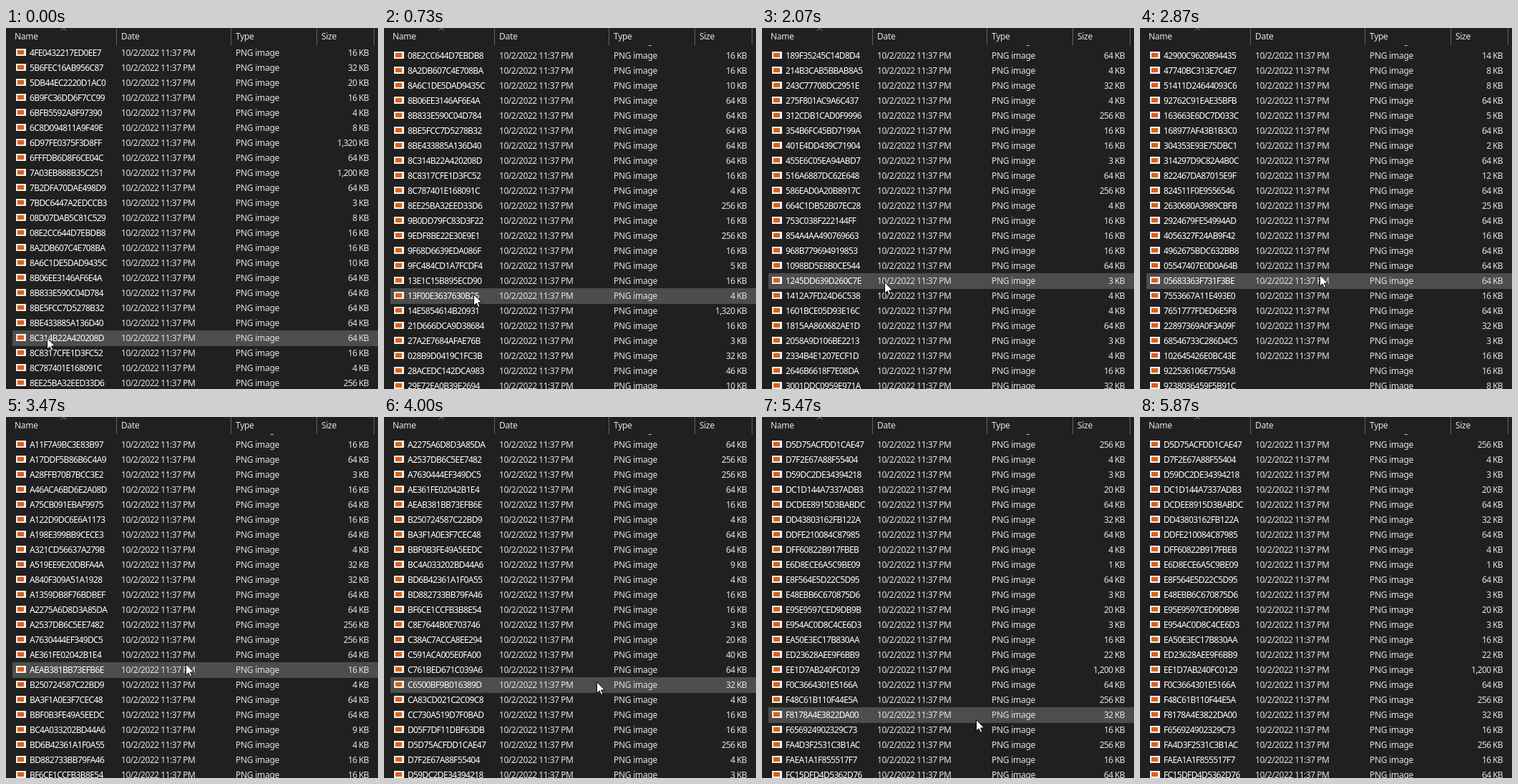
Write an HTML page with a canvas that moves like this. It is 520 px wide and 505 px high and loops after 6470 ms.

```html
<!DOCTYPE html>
<html lang="en">
<head>
<meta charset="utf-8">
<title>File list</title>
<style>
html, body { margin: 0; width: 100%; height: 100%; overflow: hidden; background: #202020; }
canvas { display: block; }
</style>
</head>
<body>
<canvas id="stage" width="520" height="505"></canvas>
<script>
const ctx = document.getElementById('stage').getContext('2d');
const LOOP = 6470, ROW = 21, HEADER = 24;

// "name size" per entry; "*count prefix from to" stands for generated entries
const listing = `4FE0432217ED0EE7 16;5B6FEC16AB956C87 32;5DB44EC2220D1AC0 20;6B9FC36DD6F7CC99 16
6BFB5592A8F97390 4;6C8D094811A9F49E 8;6D97FE0375F3D8FF 1,320;6FFFDB6D8F6CE04C 64
7A03EB888B35C251 1,200;7B2DFA70DAE498D9 64;7BDC6447A2EDCCB3 3;08D07DAB5C81C529 8
08E2CC644D7EBDB8 16;8A2DB607C4E708BA 16;8A6C1DE5DAD9435C 10;8B06EE3146AF6E4A 64
8B833E590C04D784 64;8BE5FCC7D5278B32 64;8BE433885A136D40 64;8C314B22A420208D 64
8C8317CFE1D3FC52 16;8C787401E168091C 4;8EE25BA32EED33D6 256;9B0DD79FC83D3F22 16
9EDF8BE22E30E9E1 256;9F68D6639EDA086F 16;9FC484CD1A7FCDF4 5;13E1C15B895ECD90 16
13F00E3637630B25 4;14E5854614B20931 1,320;21D666DCA9D38684 16;27A2E7684AFAE76B 3
028B9D0419C1FC3B 32;28ACEDC142DCA983 46;29E72EA0B39E2694 10
*7 - 30 41
41DA217FA5E6BC39 64;50B39A1EE8E60E87 4;51C093413D5ECABD 64;57F855ED14189B34 4
58CCAB7351D5773A 16;59EE95622AE77E42 256;64C2724A09E18167 16;68F2BCD5BBCC39F4 3
70AAB3A5C6B40F6C 32;70BC98A07B249B80 64;71F94D43FFFE0299 3;75D5142E0A45D860 64
76C8A1A0DA66C37C 16;76E9934F9EAAFBF9 30;079C1FE87FBF5124 6;80C7401289FBF3B7 16
80EA744826A0E925 5;81F77C062194B5C3 16;86ACB7E693DF3E67 4;87A677E862FC5922 16
87C2DAB6DE3730C5 64;00088D8C9802AD85 16;88B29CD9E8E873D9 32
*49 - 89 42000
42900C9620B94435 14;47740BC313E7C4E7 8;51411D24644093C6 8;92762C91EAE35BFB 64
163663E6DC7D033C 5;168977AF43B1B3C0 64;304353E93E75DBC1 2;314297D9C82A4B0C 64
822467DA87015E9F 12;824511F0E9556546 64;2630680A3989CBFB 25;2924679FE54994AD 64
4056327F24AB9F42 16;4962675BDC632BB8 64;05547407E0D0A64B 64;05683363F731F3BE 64
7553667A11E493E0 16;7651777FDED6E5F8 64;22897369A0F3A09F 32;68546733C286D4C5 3
102645426E0BC43E 16;922536106E7755A8 16;9238036459F5B91C 8
*16 A 1 2200
A2275A6D8D3A85DA 64;A2537DB6C5EE7482 256;A7630444EF349DC5 256;AE361FE02042B1E4 64
AEAB381BB73EFB6E 16;B250724587C22BD9 4;BA3F1A0E3F7CEC48 64;BBF0B3FE49A5EEDC 64
BC4A033202BD44A6 9;BD6B42361A1F0A55 4;BD882733BB79FA46 16;BF6CE1CCFB3B8E54 16
C8E7644B0E703746 3;C38AC7ACCA8EE294 20;C591ACA005E0FA00 40;C761BED671C039A6 64
C6500BF9B016389D 32;CA83CD021C2C09C8 4;CC730A519D7F0BAD 16;D05F7DF11DBF63DB 16
D5D75ACFDD1CAE47 256;D7F2E67A88F55404 4;D59DC2DE34394218 3;DC1D144A7337ADB3 20
DCDEE8915D3BABDC 64;DD43803162FB122A 32;DDFE210084C87985 64;DFF60822B917FBEB 4
E6D8ECE6A5C9BE09 1;E8F564E5D22C5D95 64;E48EBB6C670875D6 3;E95E9597CED9DB9B 20
E954AC0D8C4CE6D3 3;EA50E3EC17B830AA 16;ED23628AEE9F6BB9 22;EE1D7AB240FC0129 1,200
F0C3664301E5166A 64;F48C61B110F44E5A 256;F8178A4E3822DA00 32;F656924902329C73 16
FA4D3F2531C3B1AC 256;FAEA1A1F855517F7 16;FC15DFD4D5362D76 64`;

let seed = 7;
const random = n => (seed = seed * 16807 % 2147483647) % n;
const pick = items => items[random(items.length)];

function generate(count, prefix, from, to) {
  return Array.from({ length: count }, (_, i) => {
    let name = prefix.replace('-', '') + Math.floor(from * (to / from) ** (i / count)) + pick('ABCDEF');
    while (name.length < 16) name += pick('0123456789ABCDEF');
    return [name, pick(['64', '16', '64', '4', '16', '3', '32', '256'])];
  });
}

const files = listing.split(/[;\n]/).flatMap(entry => {
  const parts = entry.split(' ');
  return entry[0] === '*' ? generate(+parts[0].slice(1), parts[1], +parts[2], +parts[3]) : [parts];
});

// Keys are [tick, ...values], 15 ticks per second
const scrollKeys = [[0, 0], [2, 0], [10, 9], [11, 12], [14, 18], [15, 18], [21, 42], [25, 57], [28, 57],
  [38, 105], [40, 111], [42, 111], [43, 114], [48, 134], [50, 134], [52, 142], [55, 142], [57, 149],
  [59, 149], [60, 153], [62, 160], [64, 160], [67, 170], [70, 170], [71, 173]];
const pointerKeys = [[0, 57, 433], [10, 125, 372], [15, 125, 372], [21, 133, 363], [25, 142, 358],
  [28, 142, 358], [38, 240, 347], [40, 251, 345], [55, 251, 345], [57, 297, 370], [60, 297, 370],
  [62, 299, 378], [74, 299, 378], [77, 299, 381], [79, 299, 381], [88, 300, 506]];

function at(keys, tick) {
  const next = keys.findIndex(key => key[0] > tick);
  if (next < 0) return keys[keys.length - 1].slice(1);
  const a = keys[next - 1], b = keys[next];
  const f = (tick - a[0]) / (b[0] - a[0]);
  return a.slice(1).map((v, i) => Math.round(v + (b[i + 1] - v) * f));
}

function rect(color, x, y, w, h) {
  ctx.fillStyle = color;
  ctx.fillRect(x, y, w, h);
}

function text(string, x, y, spacing, color = '#e2e2e2', align = 'left') {
  ctx.fillStyle = color;
  ctx.letterSpacing = spacing + 'px';
  ctx.textAlign = align;
  ctx.fillText(string, x, y);
}

function drawHeader() {
  [['Name', 12], ['Date', 161], ['Type', 321], ['Size', 441]].forEach(([label, x]) => text(label, x, 16, -0.3));
  [154, 314, 434, 514].forEach(x => rect('#636363', x, 0, 1, HEADER));
  ctx.strokeStyle = '#a0a0a0';
  ctx.lineWidth = 1;
  ctx.stroke(new Path2D('M77 3.5L80.5 0L84 3.5'));
}

function drawFile([name, size], y, dated) {
  rect('#f4efe8', 14, y + 5, 14, 10);
  rect('#d9601c', 16, y + 7, 9, 6);
  text(name, 33, y + 15, -0.64, '#fff');
  if (dated) text('10/2/2022 11:37 PM', 161, y + 15, -0.48);
  text('PNG image', 321, y + 15, -0.27);
  text(size + ' KB', 507, y + 15, -0.62, undefined, 'right');
}

const arrow = new Path2D('M.5 .5V16.3L4.1 12.9L6.6 18.5L9 17.5L6.6 12H11.6Z');

function drawPointer(x, y) {
  ctx.save();
  ctx.translate(x, y);
  ctx.fillStyle = '#fff';
  ctx.strokeStyle = '#000';
  ctx.fill(arrow);
  ctx.stroke(arrow);
  ctx.restore();
}

function draw(time) {
  const tick = Math.floor((time % LOOP + 5) * 0.015);
  const [first] = at(scrollKeys, tick);
  const [x, y] = at(pointerKeys, tick);
  const top = first ? HEADER + 4 : HEADER;

  rect('#202020', 0, 0, 520, 505);
  ctx.font = '12px "Noto Sans", "Open Sans", sans-serif';
  drawHeader();

  ctx.save();
  ctx.beginPath();
  ctx.rect(0, HEADER, 520, 505 - HEADER);
  ctx.clip();
  if (y < 505) rect('#4d4d4d', 9, top + Math.floor((y - top) / ROW) * ROW, 511, ROW + 1);
  for (let i = Math.max(0, first - 1); i < Math.min(files.length, first + 23); i++) {
    const loading = tick === 43 && i > first + 20;
    drawFile(files[i], top + (i - first) * ROW, !loading);
  }
  ctx.restore();

  if (y < 505) drawPointer(x, y);
}

const start = performance.now();
(function loop() {
  draw(performance.now() - start);
  requestAnimationFrame(loop);
})();
</script>
</body>
</html>
```
